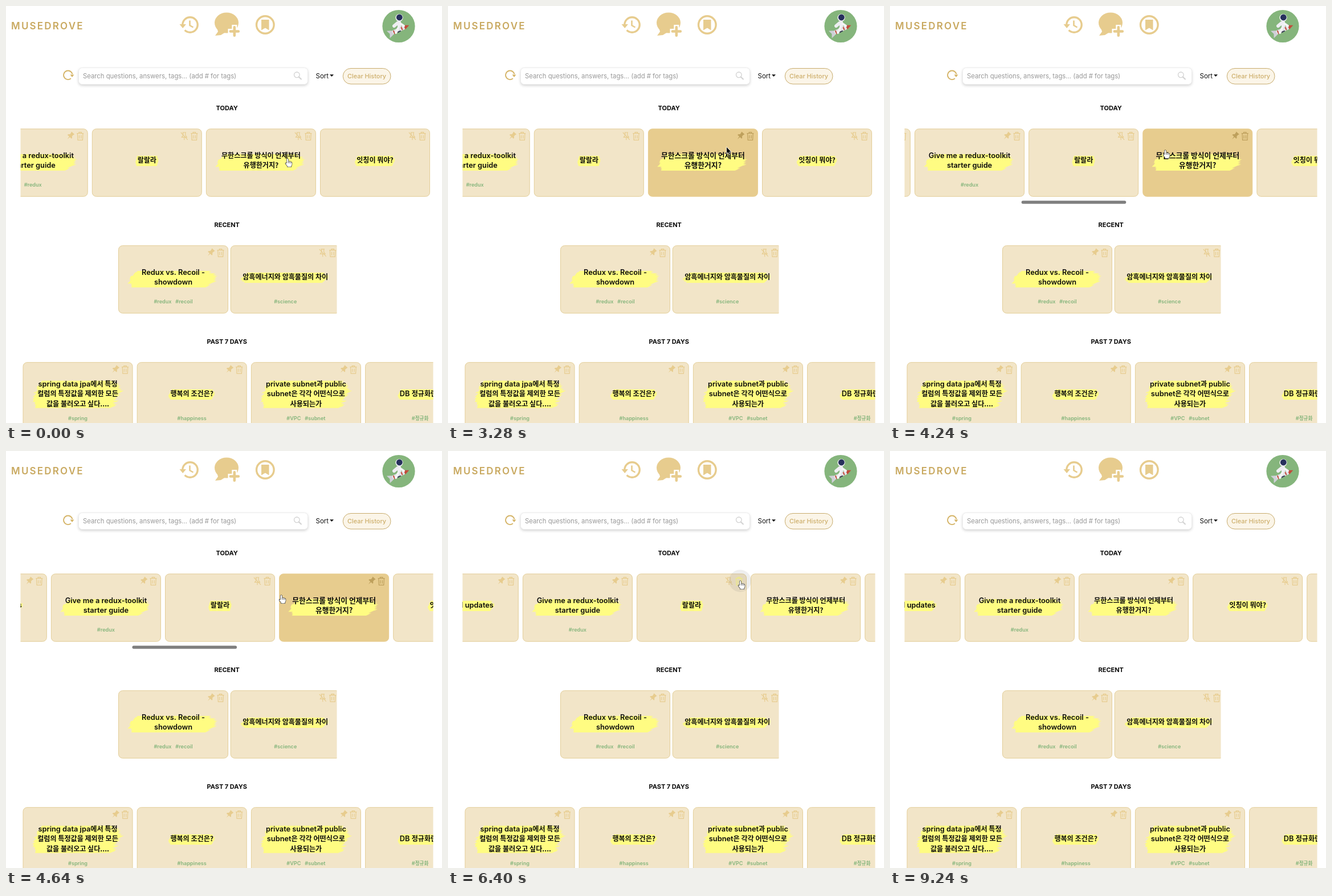
An HTML page with a canvas for the animation above (9520 ms loop, 765 by 732 pixels).

```html
<!DOCTYPE html>
<html lang="en">
<head>
<meta charset="utf-8">
<title>Chat history</title>
<style>
html, body { margin: 0; width: 100%; height: 100%; overflow: hidden; background: #fff; }
canvas { display: block; }
</style>
</head>
<body>
<canvas id="stage" width="765" height="732"></canvas>
<script>
const ctx = document.getElementById('stage').getContext('2d');
const LOOP = 9520, TICK = 40;
const GOLD = '#e7cc8e', DEEP = '#c9a960', YELLOW = '#fffc82', GREEN = '#85b57c';
const SANS = 'Inter, "Noto Sans", sans-serif';
const HANGUL = '"Noto Sans CJK KR", "Noto Sans CJK", sans-serif';

const icons = {
  pin: new Path2D('M-3.2 -6H3.2L2.5 -4.4L2.2 -1.2Q4.4 .2 4.4 2.2H.7L0 7.4L-.7 2.2H-4.4Q-4.4 .2 -2.2 -1.2L-2.5 -4.4Z'),
  unpin: new Path2D('M-3.2 -6.3H3.2M-2 -6.3V-1.4L-4.4 2H4.4L2 -1.4V-6.3M0 2V7M-6 -6.3L6 6.5'),
  trash: new Path2D('M-6 -4.6H6M-2.2 -4.6V-6.6H2.2V-4.6M-4.8 -4.6L-4.2 7H4.2L4.8 -4.6M-1.7 -1.6V4.4M1.7 -1.6V4.4'),
  arrow: new Path2D('M0 0V10.6L2.4 8.5L4.1 12.3L5.8 11.6L4.2 7.8H7.4Z'),
  hand: new Path2D('M-1.4 1Q0 -1 1.3 1V5Q2.6 4 3.6 5.3Q5 4.6 5.9 6Q7.6 5.6 7.7 7.5V10Q7.4 12 6.3 13V14.4H-.2V13Q-2 11 -3.6 8.6Q-3.9 6.9 -1.4 8.2Z')
};

// Times are in ms, values are interpolated between the points
const cursorPath = [[40, 494, 268], [400, 512, 233], [3120, 512, 233], [3280, 489, 248], [3440, 483, 253],
  [5680, 483, 253], [6120, 513, 228], [6760, 513, 228], [7160, 490, 229], [7680, 490, 229],
  [8440, 535, 440], [9240, 551, 742]];
const infiniteHover = [[40, 0], [160, .9], [240, .9], [400, 0], [3120, 0], [3240, 1], [4720, 1], [4880, 0],
  [7720, 0], [7880, 1], [8080, 1], [8520, 0]];
const lalaHover = [[5360, 0], [5520, 1], [5800, 1], [6000, 0]];
const barFade = [[3680, 0], [3720, 1], [5680, 1], [6040, 0]];
const handTimes = [[0, 320], [1120, 3160], [3400, 4760], [5440, 5720], [6000, 6840], [7760, 8120]];
const clicks = [[1720, 512.5, 233.5], [2200, 512.5, 233.5], [2800, 512.5, 233.5], [6280, 512.5, 228]];
const DELETED = 7520;

const within = (t, a, b) => t >= a && t < b;
const mix = (a, b, p) => a + (b - a) * p;
const clamp = v => Math.min(1, Math.max(0, v));
const mixColor = (a, b, p) => `rgb(${a.map((v, i) => Math.round(mix(v, b[i], p)))})`;
const noise = n => { const v = Math.sin(n * 12.9898) * 43758.5453; return v - Math.floor(v); };

function track(points, t, k = 1) {
  if (t <= points[0][0]) return points[0][k];
  for (let i = 1; i < points.length; i++) {
    const a = points[i - 1], b = points[i];
    if (t < b[0]) return mix(a[k], b[k], (t - a[0]) / (b[0] - a[0]));
  }
  return points[points.length - 1][k];
}

function scrollAt(t) {
  const first = 1 - (1 - clamp((t - 3720) / 920)) ** 1.53;
  const second = 1 - (1 - clamp((t - 4680) / 560)) ** 2;
  return 128.2 * first + 52 * second;
}

function label(text, x, y, font, color, align = 'left', spacing = 0) {
  ctx.font = `${font} ${SANS}`;
  ctx.fillStyle = color;
  ctx.textAlign = align;
  ctx.letterSpacing = spacing + 'px';
  ctx.fillText(text, x, y);
  ctx.letterSpacing = '0px';
}

// Centred line that may mix Latin and Hangul
function mixedRuns(text, size) {
  return text.split(/([가-힣][가-힣 ?.]*)/).filter(Boolean).map(run => {
    const font = /[가-힣]/.test(run) ? `600 ${size * .945}px ${HANGUL}` : `600 ${size}px ${SANS}`;
    ctx.font = font;
    return { run, font, width: ctx.measureText(run).width };
  });
}
const runsWidth = runs => runs.reduce((sum, r) => sum + r.width, 0);

function mixedText(text, cx, y, size, color) {
  const runs = mixedRuns(text, size);
  let x = cx - runsWidth(runs) / 2;
  ctx.fillStyle = color;
  ctx.textAlign = 'left';
  for (const r of runs) {
    ctx.font = r.font;
    ctx.fillText(r.run, x, y);
    x += r.width;
  }
}

function roundRect(x, y, w, h, r, fill, stroke, width = 1) {
  ctx.beginPath();
  ctx.roundRect(x, y, w, h, r);
  if (fill) { ctx.fillStyle = fill; ctx.fill(); }
  if (stroke) { ctx.strokeStyle = stroke; ctx.lineWidth = width; ctx.stroke(); }
}

function circle(x, y, r, fill) {
  ctx.beginPath();
  ctx.arc(x, y, r, 0, Math.PI * 2);
  ctx.fillStyle = fill;
  ctx.fill();
}

function poly(points, fill) {
  ctx.beginPath();
  points.forEach(p => ctx.lineTo(...p));
  ctx.closePath();
  ctx.fillStyle = fill;
  ctx.fill();
}

function line(d, color, width) {
  ctx.strokeStyle = color;
  ctx.lineWidth = width;
  ctx.stroke(new Path2D(d));
}

function icon(name, x, y, color) {
  ctx.save();
  ctx.translate(x, y);
  if (name === 'pin') {
    ctx.translate(.4, -.5);
    ctx.rotate(Math.PI / 4.3);
    ctx.scale(1.12, 1.12);
    ctx.fillStyle = color;
    ctx.fill(icons.pin);
  } else {
    ctx.strokeStyle = color;
    ctx.lineWidth = 1.2;
    ctx.stroke(icons[name]);
  }
  ctx.restore();
}

// Slanted marker stroke with ragged ends
function brush(cx, cy, w, h) {
  const rows = Math.round(h / 2.2), left = [], right = [];
  const rag = Math.min(w, 160) / 160 * Math.min(1, h / 26);
  for (let i = 0; i < rows; i++) {
    const u = i / (rows - 1), y0 = cy - h / 2 + h * i / rows, y1 = y0 + h / rows;
    const l = cx - w / 2 + rag * (26 * Math.abs(u - .66) ** 1.4 + 5 * noise(i + 3));
    const r = cx + w / 2 - rag * (30 * Math.abs(u - .38) ** 1.5 + 9 * noise(i * 2 + 11));
    left.push([l, y0], [l - 2 * rag, y1]);
    right.push([r, y0], [r - 5 * rag, y1]);
  }
  poly([...left, ...right.reverse()], YELLOW);
}

function card(c, x, y, hover = 0, hot = '') {
  const cx = x + 96.5, lines = c.lines, n = lines.length;
  const fill = mixColor([242, 229, 200], [231, 204, 142], hover);
  const edge = mixColor([227, 206, 153], [231, 204, 142], hover);
  const tint = mixColor([231, 204, 142], [190, 160, 92], hover);
  roundRect(x + .5, y + .5, 192, 118.5, 7, fill, edge);
  icon(c.pinned ? 'pin' : 'unpin', x + 162, y + 13, hot === 'pin' ? YELLOW : tint);
  icon('trash', x + 179.5, y + 13, hot === 'trash' ? YELLOW : tint);
  if (!n) return;

  const mid = y + 55.6;
  const w = n > 1 ? 161 : runsWidth(mixedRuns(lines[0], 12.8)) + 8;
  brush(cx + .5, mid + [1.2, 3.6, 1][n - 1], w, [18, 29, 48][n - 1]);
  const size = 12.8 * (1 + .057 * hover);
  lines.forEach((s, i) => mixedText(s, cx, mid + (i - (n - 1) / 2) * 17.3 + 4.5, size, '#0b0b0b'));
  if (c.tags) mixedText(c.tags, cx, y + 102, 9.1, GREEN);
}

const item = (text, pinned, tags) => ({ lines: text ? text.split('|') : [], pinned, tags });
const updates = item('Show all updates', true);
const guide = item('Give me a redux-toolkit|starter guide', true, '#redux');
const lala = item('랄랄라', false);
const infinite = item('무한스크롤 방식이 언제부터|유행한거지?', false);
const itching = item('잇칭이 뭐야?', false);
const blank = item('', false);
const recent = [
  item('Redux vs. Recoil -|showdown', true, '#redux   #recoil'),
  item('암흑에너지와 암흑물질의 차이', false, '#science')
];
const past = [
  item('spring data jpa에서 특정|컬럼의 특정값을 제외한 모든|값을 불러오고 싶다....', true, '#spring'),
  item('행복의 조건은?', true, '#happiness'),
  item('private subnet과 public|subnet은 각각 어떤식으로|사용되는가', true, '#VPC   #subnet'),
  item('DB 정규화란?', true, '#정규화')
];

function row(x, y, w, draw) {
  ctx.save();
  ctx.beginPath();
  ctx.rect(x, y - 2, w, 140);
  ctx.clip();
  draw();
  ctx.restore();
}

function avatar() {
  circle(689, 35.5, 28.6, GREEN);
  ctx.lineCap = 'round';
  line('M690 29V37M687 30L681 35', '#eeeef2', 6);
  ctx.save();
  ctx.translate(689, 42);
  ctx.rotate(-.42);
  line('M-12 0H10', '#e2e2e6', 7);
  poly([[11, -4], [20, 0], [11, 4]], '#c24a3a');
  poly([[-12, -4], [-20, -7], [-17, 0], [-20, 7], [-12, 4]], '#cfd0d8');
  line('M-9 -2V3M6 -2V2', '#c24a3a', 2);
  line('M-3 3L2 3', '#3c3f55', 2);
  ctx.restore();
  line('M692 31L698 35M688 39L684 47', '#f4f4f6', 4);
  circle(690, 20.5, 6.6, '#eeeef2');
  circle(690.3, 20, 5.4, '#26305c');
  ctx.lineCap = 'butt';
}

function header() {
  label('MUSEDROVE', 9, 40.5, '600 17px', DEEP, 'left', 2.2);

  ctx.beginPath();
  ctx.arc(323, 33, 13.2, -Math.PI, Math.PI * .75);
  ctx.strokeStyle = GOLD;
  ctx.lineWidth = 3.4;
  ctx.stroke();
  poly([[304.5, 32], [316, 32], [310.2, 39]], GOLD);
  line('M322.5 25.5V34L328.5 37.5', GOLD, 2.6);

  ctx.beginPath();
  ctx.ellipse(387, 29.5, 21, 18, 0, 0, Math.PI * 2);
  ctx.fillStyle = GOLD;
  ctx.fill();
  poly([[370, 38], [372, 45], [367, 52], [377, 51], [385, 46]], GOLD);
  line('M400.8 33V56M389.5 44.5H412', '#fff', 9);
  ctx.lineCap = 'round';
  line('M400.8 37.3V51.7M393.8 44.5H407.8', GOLD, 4.6);
  ctx.lineCap = 'butt';

  ctx.beginPath();
  ctx.arc(454.8, 33, 15.3, 0, Math.PI * 2);
  ctx.strokeStyle = GOLD;
  ctx.lineWidth = 3.4;
  ctx.stroke();
  poly([[448, 24], [461.5, 24], [461.5, 42.5], [454.8, 38.5], [448, 42.5]], GOLD);
  avatar();
}

function toolbar() {
  ctx.beginPath();
  ctx.arc(108.8, 121.3, 7.8, Math.PI * .27, Math.PI * 1.93);
  ctx.strokeStyle = '#d4b365';
  ctx.lineWidth = 1.9;
  ctx.stroke();
  poly([[112.5, 120.5], [119.5, 120.5], [116, 125]], '#d4b365');

  ctx.save();
  ctx.shadowColor = 'rgba(0,0,0,.2)';
  ctx.shadowBlur = 5;
  ctx.shadowOffsetY = 2;
  roundRect(127.5, 108.5, 402, 29, 6, '#fff');
  ctx.restore();
  roundRect(127.5, 108.5, 402, 29, 6, null, '#ececec');
  label('Search questions, answers, tags... (add # for tags)', 135, 126.5, '400 11.3px', '#989898');
  ctx.beginPath();
  ctx.arc(510.3, 120.8, 4.8, 0, Math.PI * 2);
  ctx.strokeStyle = '#d2d2d2';
  ctx.lineWidth = 1.3;
  ctx.stroke();
  line('M513.8 124.5L518.5 129', '#d2d2d2', 2);

  label('Sort', 543.5, 126.5, '400 11.5px', '#111');
  poly([[568, 120.3], [575, 120.3], [571.5, 124]], '#111');
  roundRect(591.3, 109.5, 83.7, 27.5, 13.7, '#fbf5e8', '#c7ab6c');
  label('Clear History', 633, 126.5, '500 10.9px', '#cdae6a', 'center');
}

function today(t) {
  const shift = scrollAt(t), left = -249.4 + shift;
  const gone = t >= DELETED;
  infinite.pinned = within(t, 1800, 2280) || t >= 2840;
  const cards = gone ? [updates, guide, infinite, itching, blank] : [updates, guide, lala, infinite, itching, blank];
  const hovers = new Map([[infinite, track(infiniteHover, t)], [lala, track(lalaHover, t)]]);
  const hot = new Map();
  if (within(t, 320, 3120) || within(t, DELETED, 7760)) hot.set(infinite, 'pin');
  if (within(t, 6000, 6880)) hot.set(lala, 'trash');
  if (within(t, 7040, DELETED)) hot.set(lala, 'pin');

  row(25.5, 215, 724, () => {
    cards.forEach((c, i) => card(c, left + i * 200.1, 215.3, hovers.get(c), hot.get(c)));
  });
  const alpha = track(barFade, t);
  if (alpha > 0) {
    ctx.globalAlpha = alpha;
    roundRect(254.4 - shift * .257, 341.8, 183.6, 5.4, 2.7, '#808080');
    ctx.globalAlpha = 1;
  }
}

function pointer(t) {
  for (const [start, x, y] of clicks) {
    const p = (t - start) / 200;
    if (p >= 0 && p < 1) circle(x, y, 19.5, `rgba(110,110,110,${.28 * (1 - p)})`);
  }
  if (t >= 9240) return;
  const hand = handTimes.some(([a, b]) => within(t, a, b));
  const shape = hand ? icons.hand : icons.arrow;
  ctx.save();
  ctx.translate(track(cursorPath, t, 1), track(cursorPath, t, 2));
  ctx.lineJoin = 'round';
  ctx.lineWidth = hand ? 1.1 : 1.4;
  ctx.strokeStyle = hand ? '#111' : '#fff';
  ctx.fillStyle = hand ? '#fff' : '#000';
  ctx.stroke(shape);
  ctx.fill(shape);
  if (hand) line('M1.3 5V8M3.6 5.5V8M5.9 6.2V8.4', '#222', .7);
  ctx.restore();
}

function draw(t) {
  ctx.fillStyle = '#fff';
  ctx.fillRect(0, 0, 765, 732);
  header();
  toolbar();
  [['TODAY', 183], ['RECENT', 388], ['PAST 7 DAYS', 593]]
    .forEach(([s, y]) => label(s, 387.7, y, '700 11px', '#0b0b0b', 'center'));
  today(t);
  row(196, 420, 384.5, () => recent.forEach((c, i) => card(c, 197 + i * 196.7, 420.2)));
  row(25.5, 625, 724, () => past.forEach((c, i) => card(c, 29.5 + i * 200.2, 625.2)));
  pointer(t);
}

const began = performance.now();
function frame() {
  const t = (performance.now() - began) % LOOP;
  draw(Math.floor(t / TICK) * TICK);
  requestAnimationFrame(frame);
}
frame();
</script>
</body>
</html>
```
